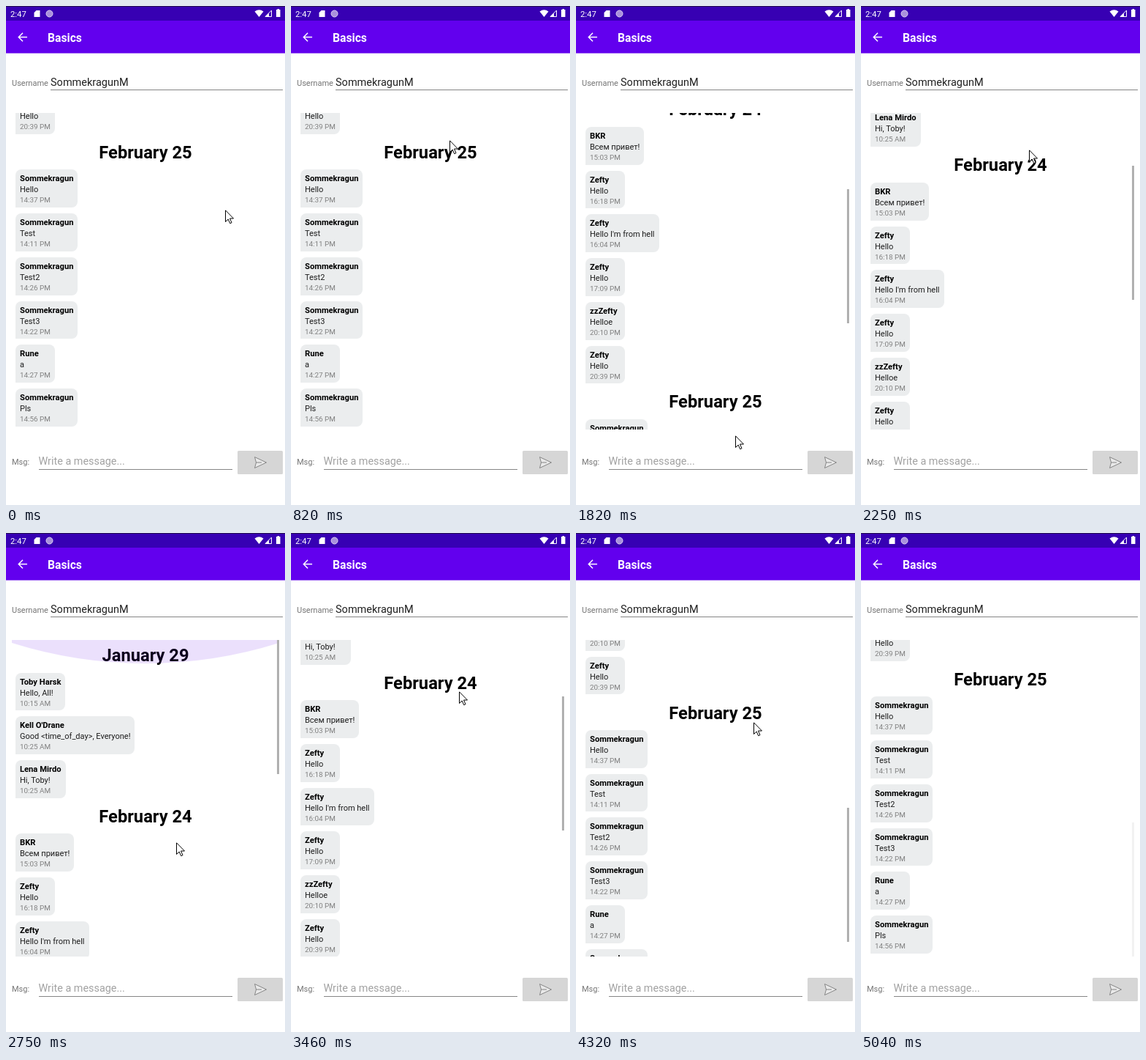
Recreate the animation shown at these times as an HTML page. Size 382 by 681 pixels, loop 5470 ms.

```html
<!DOCTYPE html>
<html lang="en">
<head>
<meta charset="utf-8">
<title>Chat history</title>
<style>
@property --s { syntax: "<number>"; inherits: true; initial-value: 586.2; }

html, body { margin: 0; width: 100%; height: 100%; overflow: hidden; background: #fff; }
body { position: relative; font-family: Roboto, sans-serif; }
.ui { position: absolute; left: 0; top: 0; width: 382px; height: 681px; }
.ui text { fill: #fff; white-space: pre; }
.ui .label { fill: #757575; font-size: 11px; }
.ui .value { fill: #212121; font-size: 14.5px; }
.ui .hint { fill: #a2a2a2; font-size: 14.4px; }

.view {
  position: absolute; left: 8px; top: 146px; width: 366px; height: 432px;
  overflow: hidden; animation: scroll 5470ms linear infinite;
}
.list { position: absolute; left: 0; top: calc(var(--s) * -1px); width: 100%; }
.thumb {
  position: absolute; right: 0; top: calc(var(--s) * .4243px);
  width: 3px; height: 183px; background: #b0b0b0;
  animation: thumb 5470ms linear infinite;
}

h2 {
  margin: 0; padding-top: 2.2px; height: 38.4px; line-height: 38.4px;
  font-size: 23.7px; font-weight: 700; text-align: center; color: #000;
}
.msg {
  width: max-content; height: 46.75px; margin: 0 0 8px 5px; padding: 5px 6px 0;
  position: relative; top: 4px; border-radius: 8px 8px 8px 0;
  background: #ebedee; color: #1c1c1c; font-size: 11px; line-height: 15px; white-space: nowrap;
}
.msg b, .msg span, .msg time { display: block; }
.msg b { color: #000; font-size: 11.2px; }
.msg time { font-size: 9.9px; line-height: 13.5px; color: #808080; }

.glow {
  position: absolute; left: 0; width: 366px; height: 32px; opacity: 0;
  fill: #6200ee; transform-origin: 50% 0;
}
.glow.top { top: 0; animation: glowTop 5470ms linear infinite; }
.glow.end { top: 432px; animation: glowEnd 5470ms linear infinite; }

.cursor {
  position: absolute; width: 13px; height: 20px; left: 300px; top: 278px;
  animation: cursor 5470ms linear infinite;
}

@keyframes scroll {
  0%, 16.27% { --s: 586.2; }
  17.55% { --s: 577; }
  22.85% { --s: 490; }
  33.27% { --s: 246; }
  36.56% { --s: 185; }
  40.95% { --s: 175; }
  47.53%, 57.22% { --s: 0; }
  63.25% { --s: 181.5; }
  66.54% { --s: 285; }
  70.57% { --s: 326; }
  72.39% { --s: 332; }
  80.44%, 100% { --s: 586.2; }
}
@keyframes thumb {
  0%, 16.2% { opacity: 0; }
  16.6%, 88.1% { opacity: 1; }
  92.1%, 100% { opacity: .17; }
}
@keyframes glowTop {
  0%, 47.53% { opacity: 0; transform: scaleY(0); }
  49.8%, 56.86% { opacity: .12; transform: scaleY(1); }
  59%, 100% { opacity: 0; transform: scaleY(0); }
}
@keyframes glowEnd {
  0%, 80.44% { opacity: 0; transform: scaleY(0); }
  82.3% { opacity: .12; transform: scaleY(-1); }
  87%, 100% { opacity: 0; transform: scaleY(0); }
}
@keyframes cursor {
  0%, 5.85% { left: 300px; top: 278px; animation-timing-function: ease-in-out; }
  14.99%, 16.27% { left: 217px; top: 183px; }
  22.85% { left: 219px; top: 329px; }
  33.27%, 34.73% { left: 218px; top: 586px; animation-timing-function: ease-in-out; }
  40.95% { left: 230px; top: 190px; }
  47.53% { left: 233px; top: 390px; }
  50.27% { left: 233px; top: 422px; }
  53.56%, 56.86% { left: 233px; top: 440px; }
  63.25% { left: 230px; top: 217px; }
  65.08% { left: 232px; top: 165px; }
  70.57% { left: 257px; top: 492px; }
  71.66% { left: 257px; top: 500px; }
  80.44% { left: 240px; top: 210px; }
  87.57% { left: 225px; top: 430px; }
  91.41%, 92% { left: 144px; top: 638px; visibility: visible; }
  92.05%, 100% { left: 144px; top: 638px; visibility: hidden; }
}
</style>
</head>
<body>
<svg class="ui" viewBox="0 0 382 681">
  <!-- status bar -->
  <path fill="#3700b3" d="M0 0H382V20H0Z"/>
  <path fill="#24104f" d="M0 0H382V1H0Z"/>
  <text x="6" y="15" font-size="11.3">2:47</text>
  <path fill="#fff" d="M41.500 6H46.500V15H38.500V9Z"/>
  <circle cx="59.500" cy="10.500" r="4.500" fill="#a991dc" stroke="#ddd3f3"/>
  <path fill="#fff" d="M340.500 7.500Q346.500 3 352.500 7.500L346.500 15Z"/>
  <path fill="none" stroke="#fff" d="M363.500 6V14.500H355Z"/>
  <path fill="#fff" d="M360 9.500V14.500H355Z"/>
  <path fill="#fff" d="M371.500 4H374V5H375.500V15H370V5H371.500Z"/>
  <!-- app bar -->
  <path fill="#6200ee" d="M0 20H382V64.600H0Z"/>
  <path fill="none" stroke="#fff" stroke-width="1.500" d="M29 42.500H17.500M23 36.800L17.300 42.500L23 48.200"/>
  <text x="57" y="49" font-size="15.7" font-weight="600">Basics</text>
  <!-- user name field -->
  <text class="label" x="8" y="109">Username</text>
  <text class="value" x="61" y="109">SommekragunM</text>
  <path fill="#858585" d="M61 114H379V115H61Z"/>
  <!-- message field -->
  <text class="label" x="8" y="626">Msg:</text>
  <text class="hint" x="44.500" y="626">Write a message...</text>
  <path fill="#858585" d="M45 632H310V633H45Z"/>
  <rect x="317" y="607" width="62" height="32" rx="1.500" fill="#d6d6d6"/>
  <path fill="#e9e9e9" stroke="#858585" stroke-linejoin="round" d="M340.500 615.500L356.500 623L340.500 630.500L342.500 623ZM342.500 623H350"/>
</svg>

<div class="view">
  <div class="list"></div>
  <svg class="glow top" viewBox="0 0 366 32"><path d="M0 0H366V4A612 612 0 0 1 0 4Z"/></svg>
  <svg class="glow end" viewBox="0 0 366 32"><path d="M0 0H366V4A612 612 0 0 1 0 4Z"/></svg>
  <div class="thumb"></div>
</div>

<svg class="cursor" viewBox="0 0 13 20">
  <path fill="#fff" stroke="#000" d="M.5 .8V16.500L4.200 13L6.700 18.700L9 17.700L6.500 12H11.500Z"/>
</svg>

<script>
const days = {
  "January 29": [
    ["Toby Harsk", "Hello, All!", "10:15 AM"],
    ["Kell O'Drane", "Good <time_of_day>, Everyone!", "10:25 AM"],
    ["Lena Mirdo", "Hi, Toby!", "10:25 AM"]
  ],
  "February 24": [
    ["BKR", "Всем привет!", "15:03 PM"],
    ["Zefty", "Hello", "16:18 PM"],
    ["Zefty", "Hello I'm from hell", "16:04 PM"],
    ["Zefty", "Hello", "17:09 PM"],
    ["zzZefty", "Helloe", "20:10 PM"],
    ["Zefty", "Hello", "20:39 PM"]
  ],
  "February 25": [
    ["Sommekragun", "Hello", "14:37 PM"],
    ["Sommekragun", "Test", "14:11 PM"],
    ["Sommekragun", "Test2", "14:26 PM"],
    ["Sommekragun", "Test3", "14:22 PM"],
    ["Rune", "a", "14:27 PM"],
    ["Sommekragun", "Pls", "14:56 PM"]
  ]
};

const list = document.querySelector(".list");

function add(parent, tag, text = "") {
  const el = document.createElement(tag);
  el.textContent = text;
  return parent.appendChild(el);
}

for (const [day, messages] of Object.entries(days)) {
  add(list, "h2", day);
  for (const [name, text, time] of messages) {
    const msg = add(list, "div");
    msg.className = "msg";
    add(msg, "b", name);
    add(msg, "span", text);
    add(msg, "time", time);
  }
}
</script>
</body>
</html>
```
